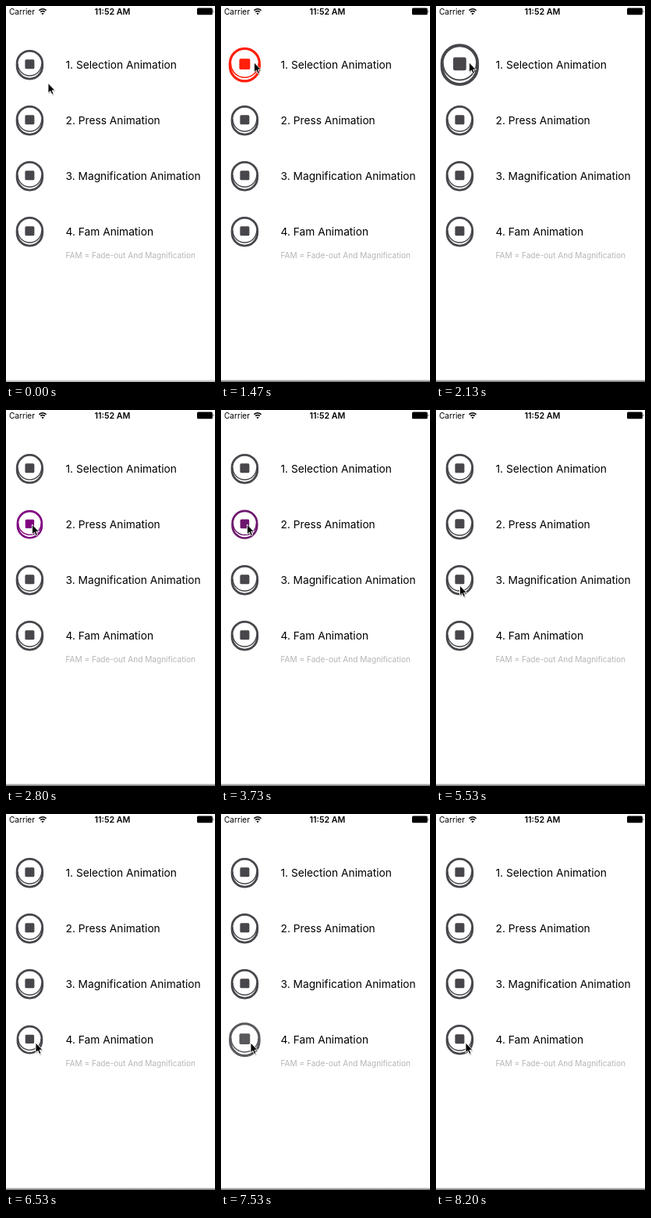
Animation of 268 by 480 pixels, one loop 8670 ms. Source, as an HTML page:

```html
<!DOCTYPE html>
<html lang="en">
<head>
<meta charset="utf-8">
<title>Button animations</title>
<style>
html, body { margin: 0; width: 100%; height: 100%; overflow: hidden; background: #fff }
svg { display: block; width: 100%; height: 100% }
text { font: 13.75px Inter, Roboto, sans-serif }
.note { font-size: 10.1px }
.time { font-size: 10.7px; font-weight: 600 }
</style>
</head>
<body>
<svg viewBox="0 0 268 480">
  <defs>
    <linearGradient id="edge" x2="0" y2="1">
      <stop stop-color="#fff"/><stop offset="1" stop-color="#666"/>
    </linearGradient>
    <g id="button" stroke="currentColor">
      <path d="M-16.3-1.7a16.3 16.3 0 0 1 32.6 0v3.2a16.3 16.3 0 0 1-32.6 0z" fill="#fff" stroke-width="2.8"/>
      <path d="M-15.4-1.7a15.4 15.4 0 0 0 30.8 0" fill="none" stroke-width="1.4"/>
      <rect x="-6" y="-7" width="12" height="12" rx="1.6" fill="currentColor" stroke="none"/>
    </g>
  </defs>
  <text class="note" x="4" y="10.5">Carrier</text>
  <g fill="none" stroke="#000" stroke-width="1.5">
    <path d="M42.4 5.6q4.6-3.8 9.2 0M44.2 7.7q2.8-2.3 5.6 0"/>
    <path d="M47 11.2L45.4 9.4q1.6-1.2 3.2 0z" fill="#000" stroke="none"/>
  </g>
  <text class="time" x="136.5" y="10.5" text-anchor="middle">11:52 AM</text>
  <rect x="245" y="2.6" width="19.8" height="8.6" rx="1.5"/>
  <path d="M265.6 5.2q1.8 1.7 0 3.4z"/>
  <g id="rows"></g>
  <text class="note" x="76.5" y="322" fill="#b5b5b5">FAM = Fade-out And Magnification</text>
  <rect id="line" y="476.5" width="268" height="3.5" fill="url(#edge)"/>
  <g id="cursor">
    <path d="M.8 1.8V14.5L3.7 11.8 5.6 16.2 7.8 15.2 5.9 11H9.8z" opacity=".22"/>
    <path d="M0 0V12.8L2.9 10.1 4.8 14.5 7 13.6 5.1 9.3H9z" stroke="#fff" stroke-width=".9"/>
  </g>
</svg>
<script>
const LOOP = 8670, DARK = '#48464b', PURPLE = '#800080', RED = '#ff1f0a';
const $ = id => document.getElementById(id);
const { sin, cos, exp, min, max, PI } = Math;

// Smooth 0..1 progress from time a to time b.
function ease(t, a, b) {
  const u = max(0, min(1, (t - a) / (b - a)));
  return u * u * (3 - 2 * u);
}

const hump = u => sin(PI * min(1, u / 660));

// Each tap is [down, up]; scale and alpha depend on the time since release.
const rows = [
  { name: 'Selection', taps: [[1130, 1270], [1880, 2030]], held: PURPLE, toggled: RED,
    scale: u => 1 + .62 * exp(-u / 250) * sin(u * PI / 250) },
  { name: 'Press', taps: [[2670, 3640]], held: PURPLE, fade: 230 },
  { name: 'Magnification', taps: [[4400, 4600], [5070, 5240]], held: PURPLE,
    scale: u => 1 - .4 * exp(-u / 80) * cos(u / 60) },
  { name: 'Fam', taps: [[6400, 6540], [7460, 7460]], held: DARK,
    scale: u => 1 + .43 * hump(u), alpha: u => 1 - .9 * hump(u) ** 2 }
];

// Cursor trips: start, end, and the point reached.
const start = [54, 98.5];
const trips = [
  [400, 1130, 42.5, 72], [2130, 2670, 33.5, 146], [4030, 4400, 30.5, 224],
  [5800, 6130, 40, 299.5], [6250, 6450, 38, 292]
];

$('rows').innerHTML = rows.map(({ name }, i) => `
  <use href="#button"/>
  <text x="76.5" y="${80.3 + 71 * i}">${i + 1}. ${name} Animation</text>`).join('');
const icons = document.querySelectorAll('#rows use');

function look({ taps, held, toggled, fade, scale, alpha }, t) {
  const done = taps.filter(tap => t >= tap[1]);
  const pressed = taps.find(([down, up]) => t >= down && t < up);
  if (pressed) return { size: 1 - .05 * ease(t, pressed[0], pressed[0] + 70), color: held, opacity: 1 };
  if (!done.length) return { size: 1, color: DARK, opacity: 1 };
  const up = done.at(-1)[1], u = t - up;
  let color = toggled && done.length % 2 ? toggled : DARK;
  if (fade) color = `color-mix(in srgb, ${DARK} ${100 * ease(u, 0, fade)}%, ${held})`;
  return {
    size: scale ? scale(u) : .95 + .05 * ease(u, 0, fade),
    color,
    opacity: alpha ? alpha(u) : 1
  };
}

function draw() {
  const t = performance.now() % LOOP;
  rows.forEach((row, i) => {
    const { size, color, opacity } = look(row, t);
    icons[i].setAttribute('transform', `translate(30.4 ${75.3 + 71 * i}) scale(${size})`);
    Object.assign(icons[i].style, { color, opacity });
  });
  let [x, y] = start;
  for (const [a, b, toX, toY] of trips) {
    const k = ease(t, a, b);
    x += (toX - x) * k;
    y += (toY - y) * k;
  }
  $('cursor').setAttribute('transform', `translate(${x} ${y})`);
  $('line').style.opacity = .55 + .45 * ease(t, 400, 1200);
  requestAnimationFrame(draw);
}
draw();
</script>
</body>
</html>
```
